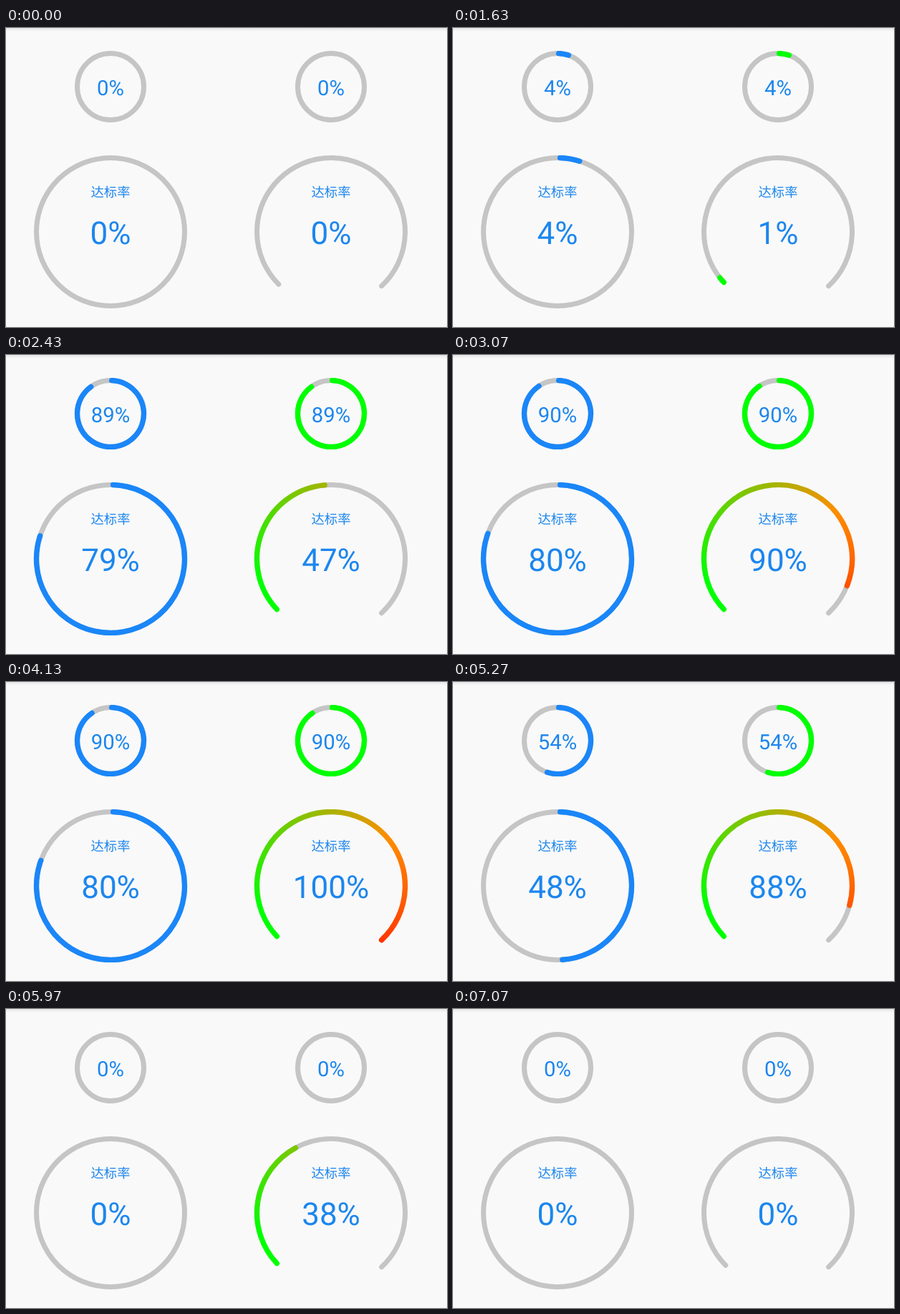
An HTML page for the animation above (7510 ms loop, 616 by 418 pixels).

```html
<!DOCTYPE html>
<html lang="zh-CN">
<head>
<meta charset="utf-8">
<title>达标率</title>
<style>
  html, body { margin: 0; width: 100%; height: 100%; overflow: hidden; background: #f9f9f9; }
  svg { display: block; width: 616px; height: 418px; }
  path, circle { fill: none; stroke-linecap: round; }
  .track { stroke: #c5c5c5; stroke-width: 7; }
  .bar { stroke-width: 7.4; }
  text { fill: #1c86ee; text-anchor: middle; text-rendering: geometricPrecision; }
  .num { font-family: Roboto, sans-serif; }
  .label { font: 18.3px "Noto Sans CJK SC", "Noto Sans CJK", sans-serif; }
</style>
</head>
<body>
<svg id="stage" viewBox="0 0 616 418">
  <defs>
    <linearGradient id="shade" x1="0" y1="0" x2="0" y2="1">
      <stop offset="0" stop-color="#e6e6e6"/>
      <stop offset="1" stop-color="#f9f9f9"/>
    </linearGradient>
    <clipPath id="views">
      <rect x="0" y="32" width="616" height="100"/>
      <rect x="0" y="178" width="616" height="214"/>
    </clipPath>
    <mask id="reveal" maskUnits="userSpaceOnUse" x="0" y="0" width="616" height="418"></mask>
  </defs>
  <rect width="616" height="418" fill="#f9f9f9"/>
  <rect width="616" height="5" fill="url(#shade)"/>
  <g id="rings" clip-path="url(#views)"></g>
  <g id="texts"></g>
</svg>
<script>
const LOOP = 7510;
const FRAME = 100 / 3;
const BLUE = '#1a86f8', GREEN = '#00ff00';
const $ = id => document.getElementById(id);

function add(parent, tag, attrs, text) {
  const el = document.createElementNS('http://www.w3.org/2000/svg', tag);
  for (const key in attrs) el.setAttribute(key, attrs[key]);
  if (text) el.textContent = text;
  return parent.appendChild(el);
}

// Angles in degrees, clockwise from three o'clock.
function arc(d, from, sweep) {
  const point = a => {
    const rad = a * Math.PI / 180;
    return (d.x + d.r * Math.cos(rad)).toFixed(3) + ' ' + (d.y + d.r * Math.sin(rad)).toFixed(3);
  };
  return `M${point(from)}A${d.r} ${d.r} 0 ${sweep > 180 ? 1 : 0} 1 ${point(from + sweep)}`;
}

// Green, then orange, then towards red along the gauge.
function heat(a) {
  const mix = (p, q, k) => Math.round(p + (q - p) * Math.min(1, Math.max(0, k)));
  const warm = (a - 165) / 157, hot = (a - 322) / 85;
  return `rgb(${mix(0, 255, warm)},${hot > 0 ? mix(140, 55, hot) : mix(255, 140, warm)},0)`;
}

const ring = { start: 272, span: 360, up: 1485, down: 4834, time: 1000 };
const small = { ...ring, y: 82, r: 46.5, max: 90, size: 29.3, base: 94 };
const big = { ...ring, y: 285, r: 103.5, max: 80, size: 44, base: 301.7, label: true };
const dials = [
  { ...small, x: 146, color: BLUE },
  { ...small, x: 454, color: GREEN },
  { ...big, x: 146, color: BLUE },
  { ...big, x: 454, gauge: true, start: 137, span: 270, max: 100, up: 1466, down: 4821, time: 2000 }
];

for (const d of dials) {
  if (d.gauge) {
    d.track = add($('rings'), 'path', { class: 'track' });
    const colors = add($('rings'), 'g', { mask: 'url(#reveal)' });
    for (let a = 130; a < 414; a += 2) {
      add(colors, 'path', {
        d: arc(d, a, 2.4), stroke: heat(a + 1), 'stroke-width': 14, style: 'stroke-linecap:butt'
      });
    }
    d.bar = add($('reveal'), 'path', { class: 'bar', stroke: '#fff' });
  } else {
    add($('rings'), 'circle', { class: 'track', cx: d.x, cy: d.y, r: d.r });
    d.bar = add($('rings'), 'path', { class: 'bar', stroke: d.color });
  }
  if (d.label) add($('texts'), 'text', { class: 'label', x: d.x, y: 236.4 }, '达标率');
  d.num = add($('texts'), 'text', { class: 'num', x: d.x, y: d.base, 'font-size': d.size });
}

function ease(k) {
  return (1 - Math.cos(Math.PI * Math.min(1, Math.max(0, k)))) / 2;
}

function draw(t) {
  for (const d of dials) {
    const p = ease((t - d.up) / d.time) - ease((t - d.down) / d.time);
    const value = Math.max(0, p * d.max);
    const sweep = d.span * value / 100;
    d.bar.setAttribute('d', sweep > 0.001 ? arc(d, d.start, sweep) : '');
    if (d.gauge) d.track.setAttribute('d', arc(d, 135 + sweep, 272 - sweep));
    d.num.textContent = Math.floor(value + 1e-6) + '%';
  }
}

function tick() {
  const t = performance.now() % LOOP;
  draw(Math.floor((t + 5) / FRAME) * FRAME);
  requestAnimationFrame(tick);
}
draw(0);
requestAnimationFrame(tick);
</script>
</body>
</html>
```
